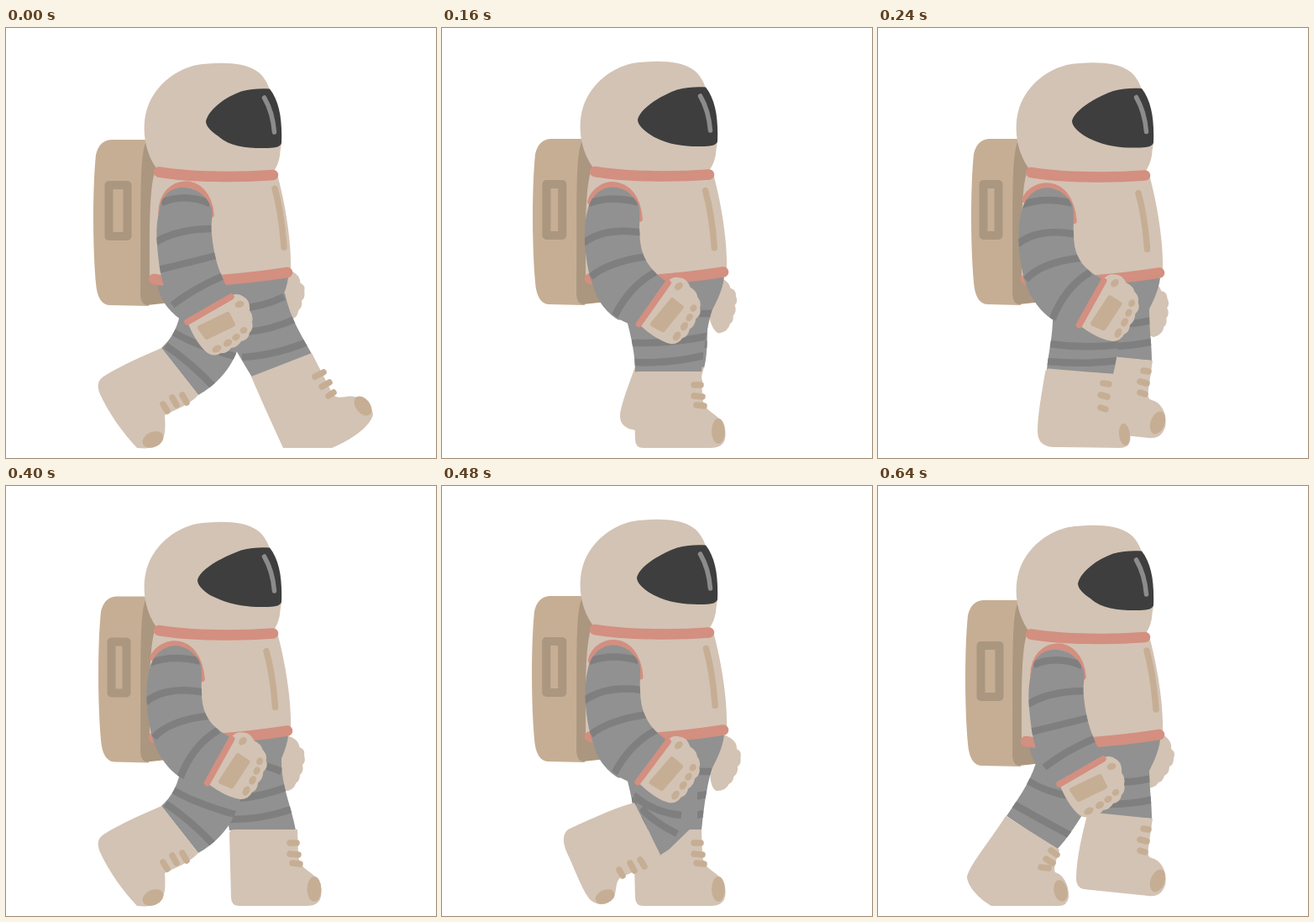
These frames come from a looping animation (512 by 512 pixels, 720 ms). An HTML page:

```html
<!DOCTYPE html>
<html lang="en">
<head>
<meta charset="utf-8">
<title>Walking astronaut</title>
<style>
html, body { margin: 0; width: 100%; height: 100%; overflow: hidden; background: #fff; }
svg { display: block; width: 100%; height: 100%; }
.pose { visibility: hidden; animation: show 720ms step-end infinite; }
@keyframes show {
  0% { visibility: visible; }
  11.1111%, 100% { visibility: hidden; }
}
.suit { fill: #d3c3b4; }
.tan { fill: #c6ae94; }
.dark { fill: #ab967f; }
.grey { fill: #919191; }
.visor { fill: #3e3e3e; }
.line { fill: none; stroke-linecap: round; stroke-linejoin: round; }
.band { fill: none; stroke: #7f7f7f; stroke-width: 8.5; }
.lace { stroke: #c6ae94; stroke-width: 7.5; }
.patch { fill: #c6ae94; stroke: #c6ae94; stroke-width: 6; stroke-linejoin: round; }
.pink { stroke: #d38f80; stroke-width: 12.5; }
.trim { stroke: #d38f80; stroke-width: 7.5; }
</style>
</head>
<body>
<svg id="stage" viewBox="0 0 512 512"></svg>
<script>
const STEP = 80, COUNT = 9;

// One stride of a leg; toe is [cx, cy, rx, ry, angle].
const plantedBoot = 'M266 414Q266 409 272 409L347 409L348 440C350 455 360 457 368 465C376 472 377 485 374 492C372 497 366 500 358 500L278 500Q268 500 268 490Z';
const plantedLaces = 'M338 425L346 425M338 438L348 439M341 449L350 450';
const stride = [
  {
    thigh: 'M235 330L332 316C338 345 353 368 364 388L293 416C280 395 270 375 250 350Z',
    bands: 'M286 333Q308 331 331 320M286 362Q315 360 348 345M281 392Q320 390 361 373',
    boot: 'M292 415L364 387L386 430C390 440 395 441 405 439C420 436 436 448 437 460C434 475 410 491 388 500L330 500C322 482 306 448 292 415Z',
    laces: 'M368 415L378 410M376 427L385 422M384 438L390 434',
    toe: [425, 450, 8.5, 13, -38]
  },
  {
    thigh: 'M245 340L330 310C322 345 340 380 345 410L266 410C264 395 257 370 245 340Z',
    bands: 'M292 330Q312 333 328 340M275 372Q305 370 336 358M264 397Q302 398 343 384',
    boot: plantedBoot, laces: plantedLaces, toe: [367, 480, 8.5, 15, 0]
  },
  {
    thigh: 'M218 340L325 325C316 350 312 380 309 410L230 410C230 390 226 370 218 340Z',
    bands: 'M285 340L322 340M226 375Q270 376 316 367M229 398Q270 400 312 390',
    boot: plantedBoot, laces: plantedLaces, toe: [367, 480, 8, 15, 0], dx: -38
  },
  {
    thigh: 'M208 338C209 365 203 385 201 407L280 412C285 395 286 370 290 330Z',
    bands: 'M203 376Q245 382 288 377M200 397Q245 401 286 396',
    boot: 'M199 410Q200 404 208 406L281 412C281 435 282 455 287 470C298 472 302 482 300 492Q298 500 288 500L210 499Q190 499 190 480C190 460 195 435 199 410Z',
    laces: 'M268 423L275 424M265 437L273 439M265 452L271 454',
    toe: [293.5, 484, 6.5, 13, -6]
  },
  {
    thigh: 'M188 330C180 355 165 375 153 393L213 433C225 420 235 405 243 392L290 345Z',
    bands: 'M175 349Q200 365 232 370M160 378Q195 398 231 417',
    boot: 'M152 393L216 433C213 445 208 455 211 460C222 463 228 478 227 490Q225 500 215 500L135 500C118 490 106 475 106 465C110 450 135 420 152 393Z',
    laces: 'M206 434L213 439M200 444L208 449M194 454L203 455',
    toe: [217.5, 482, 8, 13, -12]
  },
  {
    thigh: 'M207 342C203 360 195 372 185 381L229 437C250 425 266 408 275 385L292 340Z',
    bands: 'M199 362Q225 378 276 392M190 378Q220 398 249 429',
    boot: 'M185 381L229 437C218 449 202 454 189 461C190 475 190 485 185 493C178 501 165 501 156 500C140 483 123 460 112 436C108 426 109 420 116 415C140 400 165 390 185 381Z',
    laces: 'M187 448L192 456M198 440L203 449M210 437L215 446',
    toe: [175, 490, 13, 9, -25]
  },
  {
    thigh: 'M226 352L229 372L259 440L270 433L304 400L304 340Z',
    bands: 'M228 368Q250 388 285 392M237 384Q255 402 280 414',
    boot: 'M229 377C200 385 170 400 150 409C143 415 144 425 148 435C160 460 168 485 178 494C188 501 198 498 205 490C209 476 206 471 214 465C232 459 248 449 260 439Z',
    laces: 'M211 457L215 464M224 449L229 458M236 445L241 453',
    toe: [194, 489, 12, 8, -25]
  },
  {
    thigh: 'M226 340L322 330C312 350 319 380 312 405L234 386Z',
    bands: 'M290 327L324 328M288 348L318 348M236 379Q275 373 319 377',
    boot: 'M236 385L312 404L306 425C304 440 295 445 298 450C308 455 312 470 307 482C302 494 292 495 284 492L222 477Q211 472 212 460C215 440 228 412 236 385Z',
    laces: 'M299 418L306 421M295 430L302 432M291 438L298 441',
    toe: [300, 476, 8.5, 14, 20]
  },
  {
    thigh: 'M232 345L324 322C321 350 326 370 326 396L250 390Z',
    bands: 'M280 353Q305 353 327 348M262 379Q300 380 329 373',
    boot: 'M250 388L327 396L322 430C321 440 322 442 326 443C340 447 344 462 342 475C338 486 332 489 322 488L245 480Q235 478 236 465C237 440 243 415 250 388Z',
    laces: 'M316 408L322 409M312 421L320 423M312 434L318 436',
    toe: [333, 470, 8.5, 14, 20]
  }
];

// Upper body values, one per step; farHand is [x, y, angle].
const swing = [0, .41, .8, 1, 1.05, 1, .75, .4, 0];
const headY = [0, -1, -2, -.5, 4, 1, -2, -1, 5];
const bodyY = [0, -.5, -.5, .5, 3, .5, -.5, -.5, 5];
const packY = [0, 0, -1, -1, 2, -1.5, -2, -2, 3];
const packX = [103, 104, 107, 110, 111, 109, 106, 104, 103];
const visorX = [238, 235, 233, 231, 229, 228, 232, 236, 238];
const farHand = [
  [-3, -9, -10], [-5, -6, -15], [-12, 0, -20], [-19, 5, -25], [-12, 4, -20],
  [-5, 0, -15], [-2, 0, -8], [0, 0, 0], [-2, -2, 0]
];

const path = (cls, d) => `<path class="${cls}" d="${d}"/>`;
const oval = ([x, y, rx, ry, a]) =>
  `<ellipse class="tan" rx="${rx}" ry="${ry}" transform="translate(${x} ${y}) rotate(${a})"/>`;
const shift = (x, y, body) => `<g transform="translate(${x} ${y})">${body}</g>`;
const mix = (a, b, k) => a + (b - a) * k;

let clips = 0;
function striped(shape, bands) {
  const id = 'clip' + clips++;
  return `<clipPath id="${id}"><path d="${shape}"/></clipPath>` + path('grey', shape) +
    `<g clip-path="url(#${id})">${path('band', bands)}</g>`;
}

function mixPath(a, b, k) {
  const end = b.match(/[\d.]+/g);
  let i = 0;
  return a.replace(/[\d.]+/g, n => mix(+n, +end[i++], k).toFixed(1));
}

function leg(n) {
  const p = stride[n % COUNT];
  const boot = path('suit', p.boot) + path('line lace', p.laces) + oval(p.toe);
  return striped(p.thigh, p.bands) + shift(p.dx || 0, 0, boot);
}

function pack(i) {
  const k = swing[i], x = packX[i];
  const px = mix(122.5, 125.5, k * k), w = mix(22, 18, k);
  return shift(0, packY[i],
    path('tan', `M170 133L${x + 22} 133Q${x + 8} 134 ${x + 4} 151C${x} 190 ${x} 260 ${x + 4} 304Q${x + 6} 329 ${x + 20} 330L170 331Z`) +
    path('dark', 'M168 134C158 146 161 210 160 318Q161 330 168 330L196 327L190 170L178 160Z') +
    `<rect x="${px}" y="187" width="${w}" height="61" fill="none" stroke="#ab967f" stroke-width="10" stroke-linejoin="round"/>`);
}

function torso(i) {
  const stripe = mixPath('M320 191Q328 220 331 261', 'M310 196Q318 225 320.5 263', swing[i] ** 2);
  return shift(0, bodyY[i],
    path('suit', 'M177 172C170 195 171 250 171 299L250 302L339 290C340 258 334 215 323 174Z') +
    `<path class="line" stroke="#c6ae94" stroke-width="7.5" d="${stripe}"/>`);
}

function head(i) {
  const x = visorX[i];
  return shift(0, headY[i],
    path('suit', 'M184 173C164 151 161 118 168 96C178 66 204 49 227 44C250 41 283 39 301 53C308 59 312 67 314 74L328 137L326.5 147C326 158 322 167 316 175Z') +
    path('visor', `M${x} 111C${x + 3} 98 259 83 280 75.5C292 72 305 72 314 72.5C326 88 329 110 328 137C326 143.5 315 143 305 143C285 143 265 140 ${x + 15} 129C${x + 6} 123 ${x} 117 ${x} 111Z`) +
    '<path class="line" stroke="#8c8c8c" stroke-width="5.5" d="M307.5 83Q317.5 100 319.5 124"/>') +
    shift(0, bodyY[i], path('line pink', 'M182 171.5C220 178 280 178 318 175'));
}

function arm(i) {
  const k = swing[i];
  const sleeve = mixPath(
    'M183 215C188 182 232 181 245 215C247 225 243 235 245 245C247 268 252 290 268 318L214 350C194 336 184 302 181 270C179 250 178 235 183 215Z',
    'M170 222C178 181 218 181 232 212C234 225 232 235 233 245C233 270 242 286 268 299L237 357C202 352 178 325 171 285C167 265 166 240 170 222Z', k);
  const bands = mixPath(
    'M185 208Q213 196 243 209M178 255Q205 239 246 239M181 288Q215 280 252 270.5M198 330Q225 309 259 295',
    'M171 210Q198 200 231 208M166 257Q190 237 235 245M176 299Q195 278 243 273M207 348Q222 308 253 290', k);
  const trim = mixPath('M185 220C186 176 240 173 244 222', 'M175 204C184 182 228 175 233 229', k);
  const hand =
    path('suit', 'M216 350L269 318Q277 315 283 320Q291 324 290 336Q295 343 293 350Q295 358 290 363Q289 371 280 373Q276 380 268 381Q263 388 256 387Q248 392 240 387C230 379 222 365 216 350Z') +
    path('patch', 'M231 357L264 341L270 353L239 368Z') +
    [[278, 329, 5.5, 4, -15], [251, 382, 6, 4, -30], [264, 375, 5.5, 4, -30], [274, 368, 5, 3.8, -30], [283, 360, 4.5, 3.8, -30]].map(oval).join('') +
    path('line trim', 'M216 350L268 320');
  return shift(0, bodyY[i],
    path('line trim', trim) + striped(sleeve, bands) +
    `<g transform="translate(${12 * k} ${-7.5 * k}) rotate(${-31 * k} 241 334.5)">${hand}</g>`);
}

function backHand([x, y, a]) {
  const shape = 'M338 296C350 303 352 309 351 315Q357 319 354 326Q354 334 349 336Q349 344 343 347Q341 354 336 355Q331 363 320 361C310 355 318 325 320 305Z';
  return shift(x, y, `<g transform="rotate(${a} 338 300)">${path('suit', shape)}</g>`);
}

function pose(i) {
  const body = pack(i) + torso(i) + backHand(farHand[i]) +
    shift(0, bodyY[i], path('grey', 'M180 304L336 297C334 314 326 328 318 344L210 348C195 339 182 322 180 304Z')) +
    leg(i + 5) + leg(i) +
    shift(0, bodyY[i], path('line pink', 'M176 299C215 306 290 298 335 291')) +
    head(i) + arm(i);
  return `<g class="pose" style="animation-delay:${(i - COUNT) * STEP}ms">${body}</g>`;
}

document.getElementById('stage').innerHTML = swing.map((_, i) => pose(i)).join('');
</script>
</body>
</html>
```
